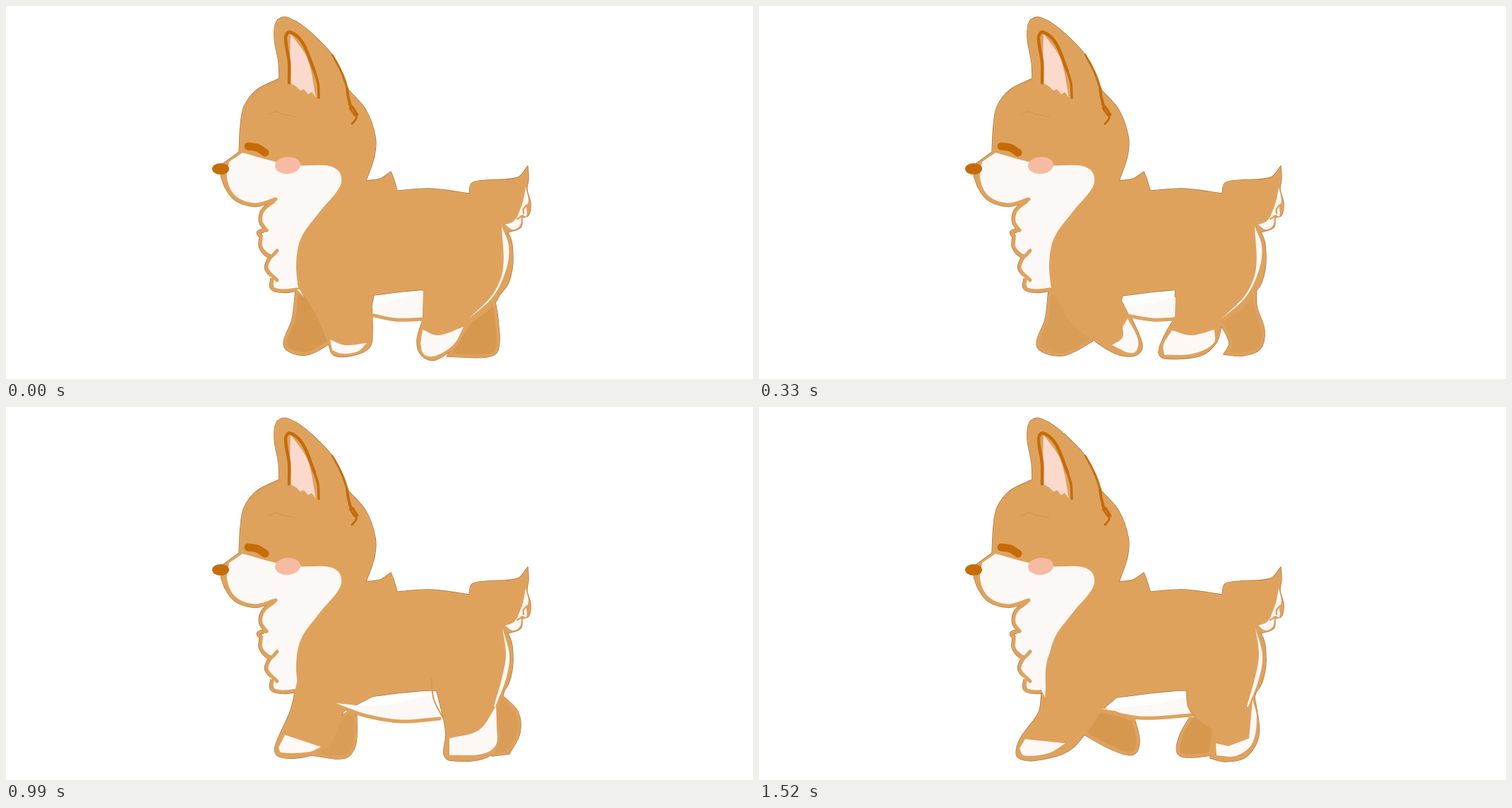
Recreate the animation shown at these times as an HTML page with a canvas. Size 1058 px wide and 529 px high, loop 1.65 s.

```html
<!DOCTYPE html>
<html lang="en">
<head>
<meta charset="utf-8">
<title>Walking corgi</title>
<style>
  html, body { margin: 0; width: 100%; height: 100%; overflow: hidden; background: #fff; }
  canvas { display: block; width: 100vw; height: 100vh; }
</style>
</head>
<body>
<canvas width="1058" height="529"></canvas>
<script>
const ctx = document.querySelector('canvas').getContext('2d');
const TAN = '#dfa25d', WHITE = '#fcf8f5', BROWN = '#c56c09', EDGE = '#a9753c';
const STEP = 330;

// Smooth path through "x,y" points; "|" makes the point before it a sharp corner.
function curve(text) {
  const path = new Path2D();
  let corner;
  for (const run of text.split('|')) {
    const points = run.trim().split(/\s+/).map(p => p.split(',').map(Number));
    if (corner) points.unshift(corner);
    else path.moveTo(...points[0]);
    for (let i = 1; i < points.length; i++) {
      const a = points[i - 1], b = points[i];
      const before = points[i - 2] || a, after = points[i + 1] || b;
      const reach = Math.hypot(b[0] - a[0], b[1] - a[1]) / 3;
      const [ux, uy] = direction(before, b), [vx, vy] = direction(a, after);
      path.bezierCurveTo(a[0] + ux * reach, a[1] + uy * reach,
        b[0] - vx * reach, b[1] - vy * reach, b[0], b[1]);
    }
    corner = points.at(-1);
  }
  return path;
}

function direction(from, to) {
  const dx = to[0] - from[0], dy = to[1] - from[1], length = Math.hypot(dx, dy) || 1;
  return [dx / length, dy / length];
}

function fill(color, text) {
  ctx.fillStyle = color;
  const path = curve(text);
  path.closePath();
  ctx.fill(path);
}

function line(color, width, text) {
  ctx.strokeStyle = color;
  ctx.lineWidth = width;
  ctx.stroke(curve(text));
}

function oval(color, x, y, rx, ry, turn = 0) {
  ctx.fillStyle = color;
  ctx.beginPath();
  ctx.ellipse(x, y, rx, ry, turn, 0, 2 * Math.PI);
  ctx.fill();
}

const head = `304,226 330,207 | 332,170 337,143 355,119 387,103 |
  386,80 380,45 383,22 397,16 425,32 462,69 478,98 485,119 |
  510,148 523,185 522,212 510,248 | 470,270 378,275 | 350,283 325,276 310,257 304,238`;
const body = `510,248 | 530,245 545,235 | 550,248 554,262 | 600,259 656,266 |
  711,322 718,358 712,392 699,410 | 600,402 470,415 412,408 | 395,270`;
const tail = `670,290 656,266 | 660,251 682,247 725,243 739,227 |
  740,245 738,260 743,280 740,297 731,300 | 729,314 711,321 | 690,312`;
const bib = `335,208 382,221 416,226 458,227 473,237 473,256 445,291 418,329 411,365 414,402 |
  395,404 380,400 | 371,370 378,355 | 362,340 366,318 | 361,300 378,276 |
  345,281 322,266 313,243 316,221`;
const chin = '307,242 322,270 352,282 382,274';
const upperCurl = '379,277 364,290 361,306 369,318';
const middleCurl = '369,318 358,321 361,327 361,342 374,355 384,347';
const lowerCurl = '375,355 369,372 384,389';
const lastCurl = '377,388 377,400 392,404 412,402';
const rims = [chin, upperCurl, middleCurl, lowerCurl, lastCurl];

const wideStripe = '702,312 712,340 709,372 690,412 655,444 | 690,408 704,372 702,312';
const narrowStripe = '703,313 713,352 708,386 693,425 | 691,425 701,390 708,352 703,313';
const lowBelly = '467,420 530,424 604,407 | 609,441 | 560,444 505,435 467,420';
const lowBellyLine = '468,423 510,438 560,446 614,442';

const upright = {
  shade: '#d6984f', stripe: wideStripe,
  far: ['410,404 405,445 393,480 407,493 430,494 460,478 | 450,410',
    '692,414 697,445 697,488 680,498 624,497 | 633,482 650,455 | 680,410'],
  near: ['413,395 440,440 457,480 464,495 490,496 515,484 519,460 518,425 | 525,390',
    '590,395 591,443 | 582,475 589,496 608,502 635,483 655,453 | 690,425 707,393'],
  belly: '519,424 555,416 591,404 | 590,442 | 552,444 519,438',
  bellyLine: '517,438 552,445 592,444',
  socks: ['459,473 480,481 511,478 | 498,490 475,493 462,488',
    '590,459 612,467 648,455 | 635,479 609,496 592,494 587,478',
    '412,402 | 416,402 | 422,413']
};

const gathered = {
  shade: '#da9d56', stripe: wideStripe,
  far: ['410,404 405,445 393,480 407,493 435,495 472,476 | 480,410',
    '705,393 705,425 716,460 710,486 685,496 658,494 | 666,478 654,452'],
  near: ['413,395 440,447 474,474 505,493 532,496 543,483 530,448 513,418 | 520,390',
    '590,395 588,443 | 573,470 566,492 575,500 625,496 648,477 656,449 | 690,425 707,393'],
  belly: '517,424 555,421 590,413 | 589,441 | 557,444 525,439',
  bellyLine: '521,439 557,445 589,444',
  socks: ['522,443 537,475 530,492 500,481 | 515,470 515,455',
    '585,460 | 612,467 645,459 | 644,478 615,493 574,495 | 573,480 585,460']
};

const lifted = {
  shade: '#d99b53', stripe: narrowStripe,
  far: ['420,464 | 418,490 | 425,500 465,499 486,490 488,470',
    '707,409 740,429 748,455 746,490 736,502 715,496 674,477 | 684,440'],
  near: ['412,390 408,430 413,467 | 440,476 485,482 494,463 473,428 | 520,410',
    '603,375 611,441 | 600,473 596,494 610,501 650,498 676,478 | 690,442 707,409 | 718,358'],
  belly: lowBelly, bellyLine: lowBellyLine,
  seam: '602,381 604,409 610,438',
  socks: ['472,443 488,465 482,477 462,478 | 468,462',
    '611,469 645,466 670,450 691,424 | 684,448 672,475 | 660,489 625,495 601,492 | 603,482']
};

const landing = {
  shade: '#da9d57', stripe: narrowStripe,
  far: ['455,460 | 484,432 497,437 | 495,480 480,498 432,494',
    '703,409 725,432 728,462 713,492 | 688,495 | 690,425'],
  near: ['412,390 403,430 381,482 385,495 410,498 440,491 460,477 478,432 | 520,410',
    '603,375 620,443 | 623,465 620,492 628,501 675,499 698,480 695,430 | 704,409 | 718,358'],
  belly: lowBelly, bellyLine: lowBellyLine,
  seam: '602,386 606,415 619,441',
  socks: ['395,465 446,482 | 430,489 390,490 386,483',
    '628,470 670,458 694,424 | 695,455 694,479 675,492 628,494']
};

const reaching = {
  shade: '#d6984f', stripe: narrowStripe,
  far: ['459,462 | 484,425 | 532,442 | 539,475 530,493 500,486 459,464',
    '610,440 596,465 592,490 605,497 641,494 | 650,440'],
  near: ['421,324 407,365 406,404 | 400,407 | 396,433 368,474 368,498 410,498 445,483 485,430 | 520,400',
    '606,390 610,430 641,457 | 642,475 639,498 | 660,503 690,496 708,465 702,411 | 718,358'],
  belly: '484,428 550,423 604,412 | 612,435 | 555,438 484,428',
  bellyLine: '483,430 540,441 614,437',
  seam: '606,404 608,425 617,438',
  socks: ['377,471 434,477 | 410,491 375,494 369,484',
    '647,477 665,481 | 694,470 | 699,415 | 705,440 698,478 675,495 648,494',
    '397,395 | 406,396 | 405,412']
};

const walk = [upright, gathered, lifted, landing, reaching];

// The clip keeps the tan rim inside the leg's silhouette.
function farLeg(shade, leg) {
  ctx.save();
  ctx.clip(curve(leg));
  fill(shade, leg);
  line(TAN, 9, leg);
  ctx.restore();
}

function drawEar() {
  fill('#fbdacd', `403,39 427,75 439,130 | 433,122 | 428,125 | 422,118 | 417,120 |
    411,114 | 402,109 | 402,75`);
  line(BROWN, 4.5, '401,109 401,80 396,45 402,37 420,52 437,93');
  line(BROWN, 3.5, '437,93 442,110 443,130');
  line(BROWN, 2.5, '462,69 475,94 484,120');
  line(BROWN, 4, '483,117 485,130 489,145');
  line(BROWN, 3, '486,139 494,149 496,159 490,167');
  line(BROWN, 3, '487,145 494,155');
  line(BROWN, 3, '491,143 498,154');
}

function drawFace() {
  line('#d3934b', 1, '348,130 362,115 387,106');
  line('#d3934b', 1, '372,154 382,150 393,154');
  line('#d3934b', 1, '390,153 411,157');
  line(BROWN, 11, '343,199 356,201 367,208');
  oval('#f7bba3', 399, 226, 18, 12, -0.08);
  oval(BROWN, 304, 231, 12, 8);
}

function drawTailTip() {
  fill(WHITE, '736,257 732,278 724,299 | 732,296 | 737,298 737,285 | 740,275 736,257');
  fill(WHITE, '707,310 718,306 725,298 | 730,298 | 728,311 718,317 707,310');
  line(TAN, 2.5, '738,282 733,288 733,294');
  line(TAN, 2.5, '724,302 731,298');
}

function draw(pose) {
  ctx.fillStyle = '#fff';
  ctx.fillRect(0, 0, 1058, 529);
  for (const part of [head, body, tail, ...pose.far, ...pose.near]) line(EDGE, 1.4, part);
  for (const rim of rims) line(EDGE, 6.2, rim);
  for (const leg of pose.far) farLeg(pose.shade, leg);
  for (const part of [body, tail, head]) fill(TAN, part);
  fill(WHITE, bib);
  for (const rim of rims) line(TAN, 5, rim);
  for (const leg of pose.near) fill(TAN, leg);
  fill(WHITE, pose.belly);
  line(TAN, 5, pose.bellyLine);
  if (pose.seam) line('#d7994f', 2, pose.seam);
  for (const patch of [...pose.socks, pose.stripe]) fill(WHITE, patch);
  drawTailTip();
  drawEar();
  drawFace();
}

ctx.lineCap = ctx.lineJoin = 'round';

function tick() {
  draw(walk[Math.floor(performance.now() / STEP) % walk.length]);
  requestAnimationFrame(tick);
}
tick();
</script>
</body>
</html>
```
